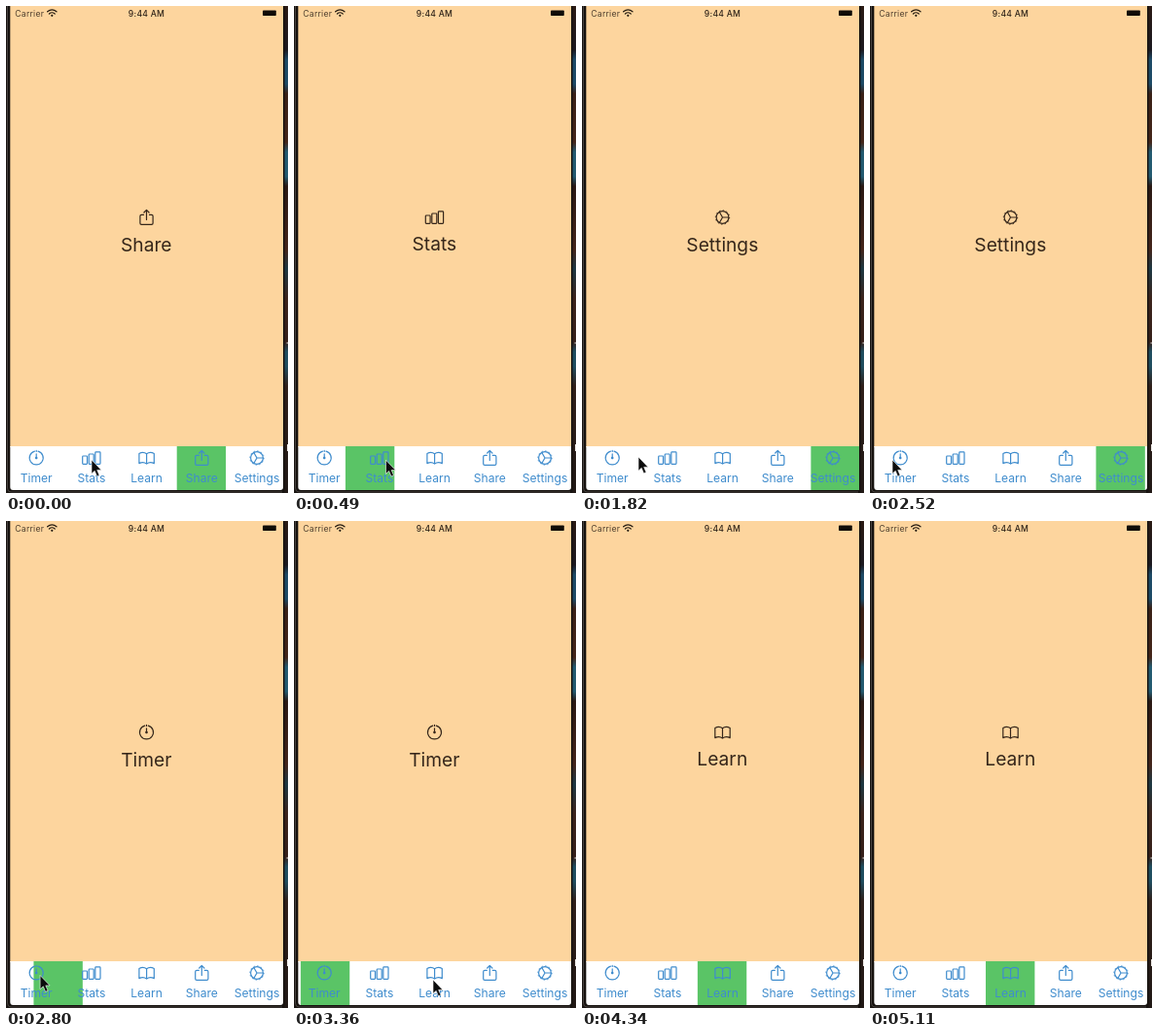
Write an HTML page that moves like this. It is 290x500 px and loops after 5.18 s.

```html
<!DOCTYPE html>
<html lang="en">
<head>
<meta charset="utf-8">
<title>Tab bar</title>
<style>
  html, body { margin: 0; width: 100%; height: 100%; overflow: hidden; background: #171310; }
  svg { display: block; width: 290px; height: 500px; }
  text { font-family: Inter, Roboto, sans-serif; }
  .status { font-size: 8.6px; letter-spacing: .25px; fill: #30251a; }
  .title { font-size: 19.2px; text-anchor: middle; fill: #35261a; }
  .label { font-size: 12.1px; text-anchor: middle; fill: #3f8ccd; }
  .icon { fill: none; stroke-width: 1.2; stroke-linecap: round; stroke-linejoin: round; }
</style>
</head>
<body>
<svg viewBox="0 0 290 500">
  <defs>
    <linearGradient id="edge" x2="0" y2="1">
      <stop offset="0" stop-color="#2a1a14"/>
      <stop offset=".09" stop-color="#1b1920"/>
      <stop offset=".11" stop-color="#1d4a66"/>
      <stop offset=".16" stop-color="#1d4a66"/>
      <stop offset=".18" stop-color="#3a2117"/>
      <stop offset=".28" stop-color="#44261a"/>
      <stop offset=".3" stop-color="#235a70"/>
      <stop offset=".35" stop-color="#235a70"/>
      <stop offset=".37" stop-color="#2a1914"/>
      <stop offset=".5" stop-color="#44251b"/>
      <stop offset=".54" stop-color="#1d3843"/>
      <stop offset=".6" stop-color="#3c241c"/>
      <stop offset=".69" stop-color="#35201a"/>
      <stop offset=".71" stop-color="#1f4d5f"/>
      <stop offset=".74" stop-color="#1f4d5f"/>
      <stop offset=".78" stop-color="#30201a"/>
      <stop offset="1" stop-color="#201815"/>
    </linearGradient>
    <clipPath id="bar"><rect x="5" y="452" width="280" height="45"/></clipPath>

    <g id="Timer">
      <path d="M1.8-6.8A7 7 0 1 1-1.8-6.8M0-7.6V-6.6M0 0V-4.2"/>
      <circle r=".7"/>
    </g>
    <g id="Stats">
      <rect x="-9.2" y="-2" width="4.8" height="8.4" rx=".8"/>
      <rect x="-2.7" y="-4" width="5" height="10.4" rx=".8"/>
      <rect x="3.9" y="-6.2" width="5.2" height="12.6" rx=".8"/>
    </g>
    <g id="Learn">
      <path d="M0-4.2C-2-5.9-5.4-5.9-7.7-4.6V5.6C-5.4 4.4-2 4.4 0 6.1C2 4.4 5.4 4.4 7.7 5.6V-4.6C5.4-5.9 2-5.9 0-4.2V6"/>
    </g>
    <g id="Share">
      <path d="M-3-2.6H-5.2Q-6.6-2.6-6.6-1.2V6Q-6.6 7.4-5.2 7.4H5.2Q6.6 7.4 6.6 6V-1.2Q6.6-2.6 5.2-2.6H3M0 2.4V-7.4M-2.6-5L0-7.6L2.6-5"/>
    </g>
    <g id="Settings">
      <circle r="6.4"/>
      <circle r="7.2" stroke-width=".9" stroke-dasharray="1.4 2.37" stroke-linecap="butt"/>
      <path d="M0 0H6.3M-3.15-5.46L0 0L-3.15 5.46"/>
    </g>
  </defs>

  <rect width="290" height="500" fill="#171310"/>
  <rect x="286.5" width="3.5" height="500" fill="url(#edge)"/>
  <path d="M1.5 0V495Q1.5 499 5 499H284" fill="none" stroke="#55504c" stroke-width=".8"/>
  <path d="M288.5 346H290M289.5 450V457" stroke="#e8e4e0"/>
  <rect x="4.3" width="280.7" height="453" fill="#fdd59e"/>
  <path d="M4.3 452H285V494Q285 497 282 497H7.3Q4.3 497 4.3 494Z" fill="#fff"/>

  <text class="status" x="9.3" y="10.5" fill-opacity=".85">Carrier</text>
  <g class="icon" stroke="#22190f" stroke-width="1.5">
    <path d="M42.6 5.8Q47.3 1.8 52 5.8M44.4 8Q47.3 5.5 50.2 8"/>
    <circle cx="47.3" cy="9.8" r=".5"/>
  </g>
  <text class="status" x="144.5" y="10.5" text-anchor="middle" font-weight="500">9:44 AM</text>
  <rect x="264" y="4.5" width="13.8" height="5.5" rx=".8" fill="#100c08"/>

  <use id="pageIcon" class="icon" x="144.5" y="217" stroke="#35261a"/>
  <text id="pageTitle" class="title" x="144.3"></text>

  <g clip-path="url(#bar)"><rect id="marker" y="452" width="50.4" height="45" fill="#5ac466"/></g>
  <g id="tabs"></g>
  <path id="cursor" d="M0 0V14.2L3.2 11.3L5.5 16.8L8 15.7L5.7 10.4H10Z" fill="#0c0c0c" stroke="#fff" stroke-opacity=".75" stroke-width=".8"/>
</svg>
<script>
const LOOP = 5180, STEP = 70;
const TABS = ['Timer', 'Stats', 'Learn', 'Share', 'Settings'];
const tabX = i => 31.2 + 56.7 * i;
const $ = id => document.getElementById(id);

// [time, tab]
const TAPS = [[150, 1], [1290, 4], [2590, 0], [3450, 2]];
// [time, x, y]
const MOVES = [
  [0, 88, 466], [400, 88, 466], [1120, 239, 470], [1260, 246, 470], [1370, 246, 470],
  [1820, 58, 463], [2250, 23, 466], [2680, 23, 466], [3290, 143, 471], [3600, 143, 471],
  [3850, 117, 464], [4450, 60, 505]
];

$('tabs').innerHTML = TABS.map((name, i) =>
  `<use href="#${name}" class="icon" x="${tabX(i)}" y="464" stroke="#3f8ccd"/>` +
  `<text class="label" x="${tabX(i)}" y="489">${name}</text>`).join('');

// Underdamped spring from 0 to 1
function spring(ms, response = 0.55, damping = 0.62) {
  const t = ms / 1000, w = 2 * Math.PI / response;
  const root = Math.sqrt(1 - damping * damping), a = w * root * t;
  return 1 - Math.exp(-damping * w * t) * (Math.cos(a) + damping / root * Math.sin(a));
}

function cursorAt(t) {
  const next = MOVES.findIndex(m => m[0] > t);
  if (next < 0) return null;
  const [t0, x0, y0] = MOVES[next - 1], [t1, x1, y1] = MOVES[next];
  const u = (t - t0) / (t1 - t0), e = u * u * (3 - 2 * u);
  return [x0 + (x1 - x0) * e, y0 + (y1 - y0) * e];
}

function draw(t) {
  let tab = 3, x = tabX(tab);
  for (const [at, to] of TAPS) {
    if (t < at) break;
    x += (tabX(to) - tabX(tab)) * spring(t - at);
    tab = to;
  }
  $('marker').setAttribute('x', x - 25.6);

  $('pageIcon').setAttribute('href', '#' + TABS[tab]);
  $('pageTitle').textContent = TABS[tab];
  $('pageTitle').setAttribute('y', tab === 1 || tab === 2 ? 251 : 252.4);

  const pos = cursorAt(t);
  $('cursor').setAttribute('visibility', pos ? 'visible' : 'hidden');
  if (pos) $('cursor').setAttribute('transform', `translate(${pos})`);
}

const start = performance.now();
function tick() {
  const t = (performance.now() - start) % LOOP;
  draw(Math.floor(t / STEP) * STEP);
  requestAnimationFrame(tick);
}
tick();
</script>
</body>
</html>
```
